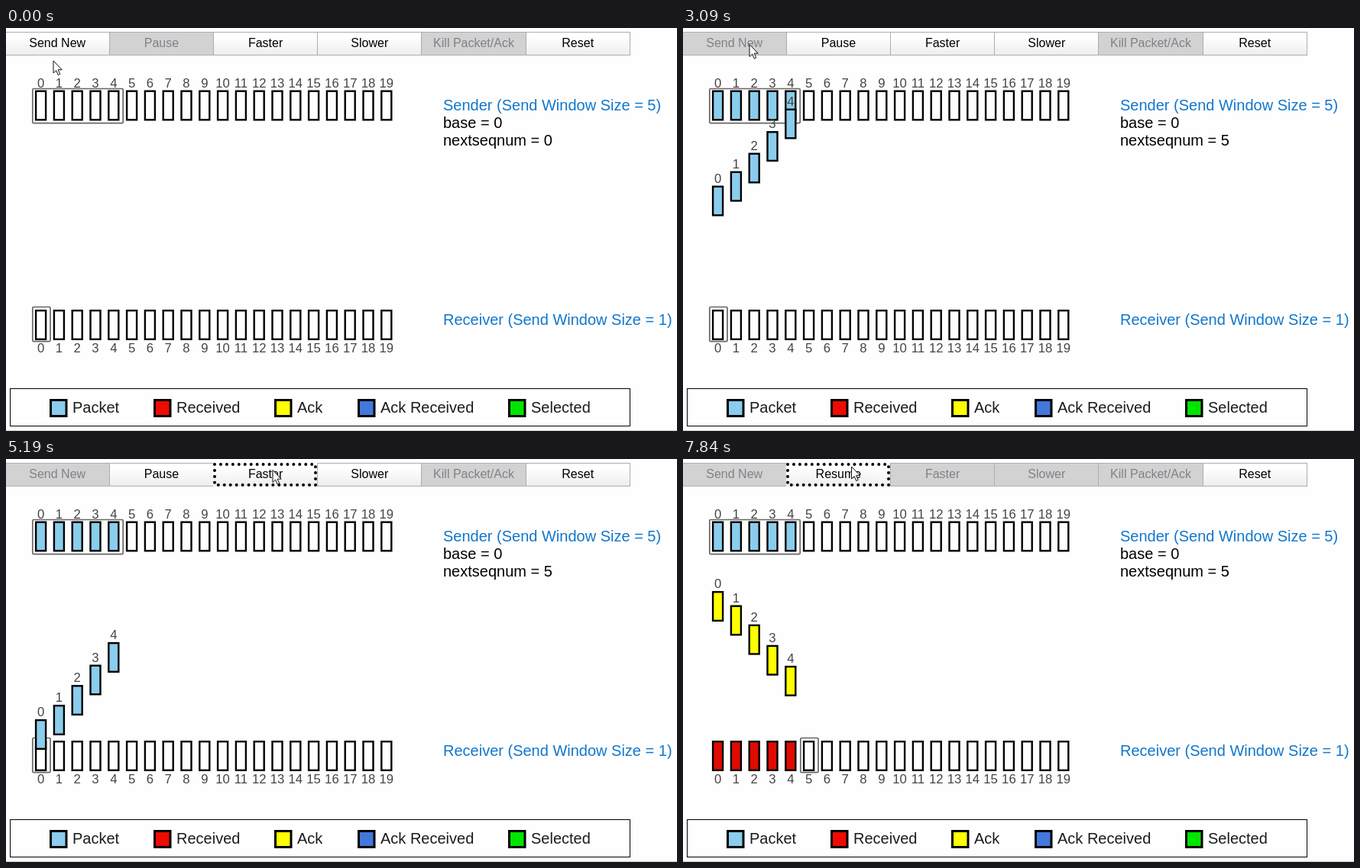
Recreate the animation shown at these times as an HTML page. Size 878x528 px, loop 8 s.

```html
<!DOCTYPE html>
<html lang="en">
<head>
<meta charset="utf-8">
<title>Sliding window protocol</title>
<style>
  html, body { margin: 0; width: 100%; height: 100%; overflow: hidden; background: #fefefe; }
  svg { display: block; font-family: "Liberation Sans", Arial, sans-serif; }
</style>
</head>
<body>
<svg width="878" height="528" viewBox="0 0 878 528">
  <defs>
    <linearGradient id="face" x2="0" y2="1">
      <stop offset=".2" stop-color="#fff"/><stop offset="1" stop-color="#ededed"/>
    </linearGradient>
  </defs>
  <g id="stage"></g>
</svg>
<script>
const LOOP = 8000, PITCH = 23.8, FIRST_X = 45.6;
const SENDER_Y = 81.5, RECEIVER_Y = 369;
const SLOW = 0.0539, ACK_SPEED = 0.0859, FASTER_AT = 4480;
const COLOR = { packet: '#8acdec', received: '#e00a00', ack: '#ffff00' };

// Launch time, speed after "Faster", and time the ack leaves the receiver.
const packets = [
  { launch: 770, fast: 0.085, ack: 5537 },
  { launch: 1122, fast: 0.085, ack: 5752 },
  { launch: 1568, fast: 0.0823, ack: 6045 },
  { launch: 2096, fast: 0.085, ack: 6360 },
  { launch: 2644, fast: 0.085, ack: 6676 },
];

// The picture refreshes in bursts of four steps followed by a short hold.
const bursts = [770, 1170, 1560, 1940, 2320, 2710, 3090, 3480, 3870, 4270,
  4650, 5030, 5430, 5820, 6220, 6600, 6980, 7370, 7750];
const ticks = [0, 80, 150, 230, 380, 630,
  ...bursts.flatMap(b => [0, 80, 150, 230].map(d => b + d))].filter(t => t <= 7840);

const pointerPath = [[0, 62, 43], [230, 81, 24], [380, 87, 21.5], [3090, 87, 21.5],
  [3330, 274, 12], [3560, 343, 14], [3870, 349, 14.5], [5890, 349, 14.5],
  [5970, 344.5, 14], [6050, 248, 11], [6300, 220.5, 10]];

const text = (x, y, str, size, fill, anchor = 'start') =>
  `<text x="${x}" y="${y}" font-size="${size}" fill="${fill}" text-anchor="${anchor}">${str}</text>`;
const rect = (x, y, w, h, fill, stroke, width, extra = '') =>
  `<rect x="${x}" y="${y}" width="${w}" height="${h}" fill="${fill}" stroke="${stroke}" stroke-width="${width}" ${extra}/>`;

const slotX = i => FIRST_X + i * PITCH;
const slot = (i, y, fill) => rect(slotX(i) - 6.5, y + 1.2, 13, 37.6, fill, '#000', 2.4);
const number = (i, y) => text(slotX(i), y, i, 16.7, '#444', 'middle');
const windowFrame = (i, y, size) =>
  rect(slotX(i) - 10.8, y - 2, PITCH * size - 0.6, 45.2, 'none', '#666', 1.7, 'rx="1.5"');

function button(i, label, enabled, focused) {
  const left = Math.floor(-1 + 136.2 * i), width = Math.floor(135.2 + 136.2 * i) - left;
  const fill = enabled ? 'url(#face)' : '#d2d2d2';
  const box = focused
    ? rect(left, 5, width, 31, fill, 'none', 0) +
      rect(left + 2, 7, width - 4, 27, 'none', '#000', 4,
        'pathLength="40" stroke-dasharray="0 1" stroke-linecap="round"')
    : rect(left + 0.5, 5.5, width, 30, fill, '#adadad', 1);
  return box + text(67.2 + 136.2 * i, 25, label, 16, enabled ? '#000' : '#80808a', 'middle');
}

function toolbar(t) {
  const paused = t >= 7750;
  const focus = t < 630 ? -1 : t < 2710 ? 0 : t < 4350 ? -1 : t < 7450 ? 2 : 1;
  const buttons = [
    ['Send New', t < 2710],
    [paused ? 'Resume' : 'Pause', t >= 770],
    ['Faster', !paused],
    ['Slower', !paused],
    ['Kill Packet/Ack', false],
    ['Reset', true],
  ].map(([label, enabled], i) => button(i, label, enabled, i === focus));
  if (focus >= 0) buttons.push(...buttons.splice(focus, 1));
  return buttons.join('');
}

function legend() {
  const items = [[57, '#8acdec', 'Packet'], [193, '#ee0b00', 'Received'],
    [351, '#ffff00', 'Ack'], [460, '#4277dc', 'Ack Received'], [657, '#00e500', 'Selected']];
  return rect(5.5, 472.5, 811, 49, 'none', '#000', 1) +
    items.map(([x, fill, label]) =>
      rect(x + 1.5, 487.5, 20.5, 21, fill, '#000', 3) + text(x + 30, 504, label, 20, '#1c1c1c')).join('') +
    rect(0, 527, 878, 1, '#ccc', 'none', 0);
}

function traveller(p, i, t) {
  if (t < p.launch) return '';
  const acked = t >= p.ack;
  const y = acked
    ? 370 - ACK_SPEED * (t - p.ack)
    : SENDER_Y + SLOW * (Math.min(t, FASTER_AT) - p.launch) + p.fast * Math.max(0, t - FASTER_AT);
  return slot(i, y, acked ? COLOR.ack : COLOR.packet) + number(i, y - 3.6);
}

function pointer(t) {
  const next = pointerPath.findIndex(k => k[0] > t);
  let [, x, y] = pointerPath.at(-1);
  if (next > 0) {
    const [t0, x0, y0] = pointerPath[next - 1], [t1, x1, y1] = pointerPath[next];
    const f = (t - t0) / (t1 - t0);
    x = x0 + (x1 - x0) * f;
    y = y0 + (y1 - y0) * f;
  }
  return `<path transform="translate(${x} ${y})" d="M0 0V16L3.7 12.6 6.2 18.6 8.7 17.5 6.2 11.7H11.2Z"
    fill="#fff" stroke="#111" stroke-width="1"/>`;
}

function scene(t) {
  const sent = packets.filter(p => t >= p.launch).length;
  const received = packets.filter(p => t >= p.ack).length;
  let out = toolbar(t);
  for (let i = 0; i < 20; i++) {
    out += number(i, 78) + slot(i, SENDER_Y, i < sent ? COLOR.packet : '#fefefe');
    out += number(i, 425) + slot(i, RECEIVER_Y, i < received ? COLOR.received : '#fefefe');
  }
  out += windowFrame(0, SENDER_Y, 5) + windowFrame(received, RECEIVER_Y - 1.5, 1);
  out += packets.map((p, i) => traveller(p, i, t)).join('');
  out += text(572, 108, 'Sender (Send Window Size = 5)', 20, '#1177cc') +
    text(572, 131, 'base = 0', 20, '#000') +
    text(572, 154, `nextseqnum = ${sent}`, 20, '#000') +
    text(572, 389, 'Receiver (Send Window Size = 1)', 20, '#1177cc');
  return out + legend() + pointer(t);
}

const stage = document.getElementById('stage');
const start = performance.now();
let shown = -1;

function draw() {
  const t = (performance.now() - start) % LOOP;
  const tick = ticks.findLast(k => k <= t);
  if (tick !== shown) stage.innerHTML = scene(shown = tick);
  requestAnimationFrame(draw);
}
draw();
</script>
</body>
</html>
```
